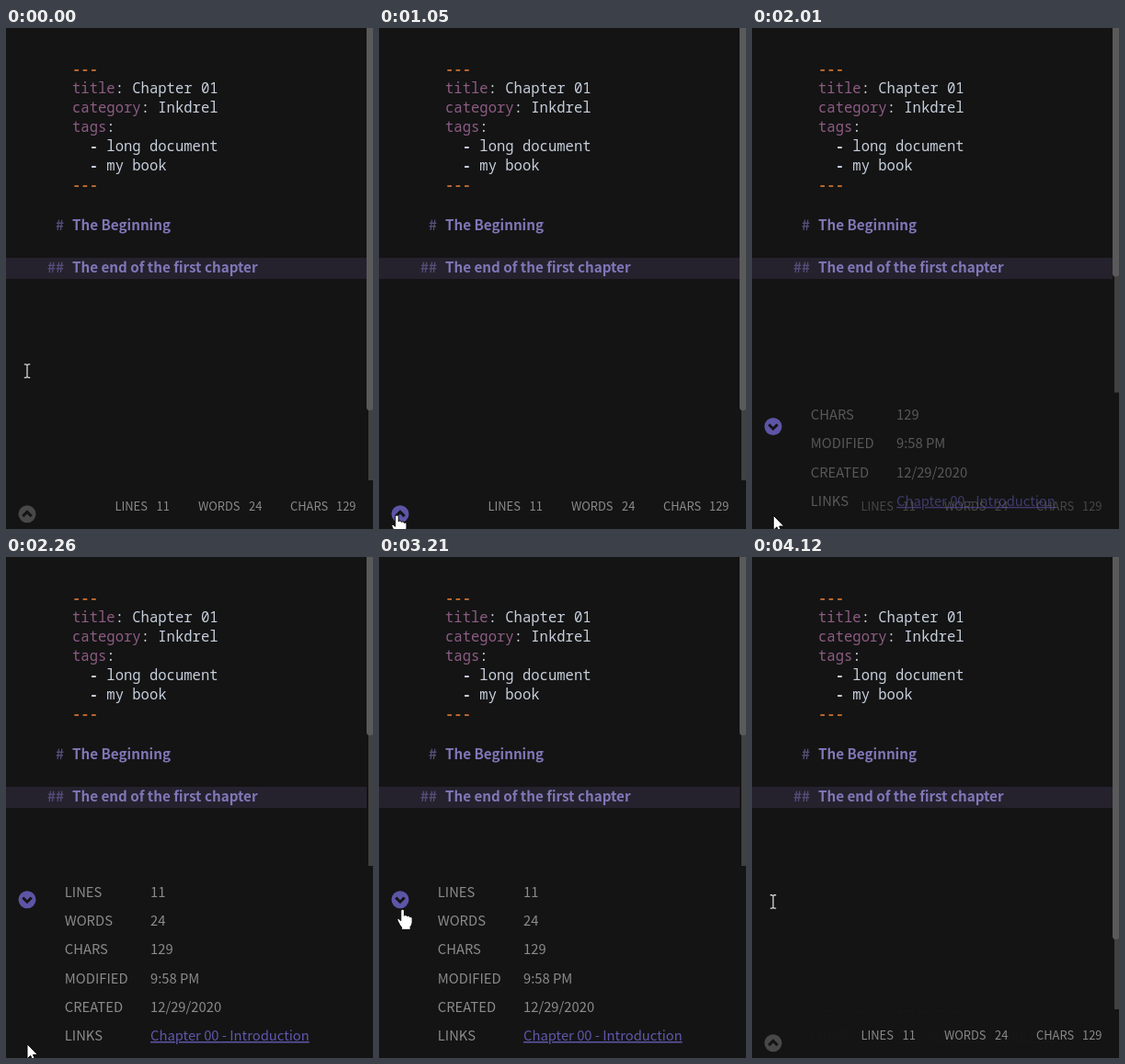
An HTML page for the animation above (4170 ms loop, 399 by 545 pixels).

```html
<!DOCTYPE html>
<html lang="en">
<head>
<meta charset="utf-8">
<title>Document details panel</title>
<style>
  html, body { margin: 0; width: 100%; height: 100%; overflow: hidden; background: #141414; }
  svg { display: block; width: 100vw; height: 100vh; }
  text { white-space: pre; }
  .mono { font: 500 15.55px "Noto Sans Mono", "DejaVu Sans Mono", monospace; fill: #c6cfdc; }
  .sans { font: 14.78px "Noto Sans CJK JP", "Noto Sans CJK SC", "Noto Sans CJK", "Noto Sans", sans-serif; fill: #8b8b8b; }
  .small { font-size: 12.9px; }
  .heading { font-size: 15.2px; font-weight: 700; fill: #8177b8; }
  .mark { fill: #544c76; text-anchor: end; }
  .rule { fill: #b5662f; }
  .dash { font-weight: 700; }
  .key { fill: #8d5c84; }
  .link { fill: #5f57ab; text-decoration: underline; }
</style>
</head>
<body>
<svg viewBox="0 0 399 545" preserveAspectRatio="xMinYMin meet">
  <defs><clipPath id="panelClip"><rect id="clipRect" width="399" height="300"/></clipPath></defs>
  <rect width="399" height="545" fill="#141414"/>
  <rect y="250" width="392" height="23" fill="#25222e"/>
  <g id="editor"></g>
  <rect id="track" x="394" width="5" fill="#414141"/>
  <rect id="thumb" x="392" y="-8" width="7.5" rx="3.5" fill="#5a5a5a"/>
  <rect id="panel" width="399" height="300" fill="#141414"/>
  <g clip-path="url(#panelClip)">
    <g id="status"></g>
    <g id="details"></g>
  </g>
  <g id="button">
    <circle id="disc" r="9.5"/>
    <path id="chevron" d="M-4.7 2.3 0 -2.4 4.7 2.3" fill="none" stroke="#141414" stroke-width="3"/>
  </g>
  <g id="pointer" stroke-linejoin="round">
    <path id="beam" fill="none" stroke="#d8d8d8" stroke-width="1.3"
      d="M-3.2 -7.2H-1.2L0 -6.3 1.2 -7.2H3.2M0 -6.5V6.5M-3.2 7.2H-1.2L0 6.3 1.2 7.2H3.2"/>
    <path id="arrow" fill="#fff" stroke="#000" stroke-width=".9"
      d="M0 0V16L3.7 12.6 6.2 18 8.8 16.9 6.4 11.7H11.5Z"/>
    <path id="hand" fill="#fff" stroke="#000" stroke-width=".9"
      d="M-1.8 1.5Q-1.8 0 0 0T1.8 1.5V7Q2 5.8 3.4 6T5 7.6Q5.3 6.6 6.6 6.9T8 8.5Q8.4 7.8 9.4 8.1T10.5 9.8V14
         Q10.5 17 8.5 19V22H-1V19.5Q-3 17.5 -4.8 13.5 -6.4 10.8 -5 10.2 -3.6 9.8 -1.8 12.4Z"/>
  </g>
</svg>
<script>
const LOOP = 4170, OPEN_AT = 1780, CLOSE_AT = 3690;
const TOP_CLOSED = 492, TOP_OPEN = 336, CONTENT_HEIGHT = 582;
const BUTTON_X = 23, BUTTON_OFFSET = 36.8;

// Pointer hotspot: time, x, y
const POINTER = [
  [0, 23, 373], [200, 23, 394], [400, 23, 394], [800, 23, 527], [900, 22, 518],
  [1050, 19.5, 530], [1150, 15, 530], [1350, 24, 531], [2260, 23, 530], [2310, 24, 522],
  [2710, 36, 415], [2860, 32, 398], [3410, 22, 375], [4120, 23, 375], [LOOP, 23, 373]
];

const $ = id => document.getElementById(id);
const set = (id, attrs) => {
  for (const name in attrs) $(id).setAttribute(name, attrs[name]);
};
const mix = (a, b, p) => a + (b - a) * p;
const progress = (t, start, length) => Math.min(1, Math.max(0, (t - start) / length));
const smooth = p => p * p * (3 - 2 * p);

function addText(parent, x, y, style, content) {
  const node = document.createElementNS("http://www.w3.org/2000/svg", "text");
  node.setAttribute("x", x);
  node.setAttribute("y", y);
  node.setAttribute("class", style);
  node.textContent = content;
  $(parent).append(node);
  return node;
}

// A line that starts with a differently styled part
function addLine(y, style, lead, rest) {
  const line = addText("editor", 72, y, "mono", "");
  const span = document.createElementNS(line.namespaceURI, "tspan");
  span.setAttribute("class", style);
  span.textContent = lead;
  line.append(span, rest);
}

function build() {
  addText("editor", 72, 49.5, "mono rule dash", "---");
  addLine(71, "key", "title", ": Chapter 01");
  addLine(92, "key", "category", ": Inkdrel");
  addLine(113, "key", "tags", ":");
  addLine(134, "dash", "  -", " long document");
  addLine(155, "dash", "  -", " my book");
  addText("editor", 72, 175.5, "mono rule dash", "---");

  [["#", "The Beginning", 220], ["##", "The end of the first chapter", 266]].forEach(([mark, title, y]) => {
    addText("editor", 63, y, "sans heading mark", mark);
    addText("editor", 72, y, "sans heading", title);
  });

  [["LINES", 118.5, "11", 163.5], ["WORDS", 209, "24", 264], ["CHARS", 309, "129", 359]].forEach(([label, x, value, valueX]) => {
    addText("status", x, 525, "sans small", label);
    addText("status", valueX, 525, "sans small", value);
  });

  [["LINES", "11"], ["WORDS", "24"], ["CHARS", "129"], ["MODIFIED", "9:58 PM"],
   ["CREATED", "12/29/2020"], ["LINKS", "Chapter 00 - Introduction"]].forEach(([label, value], i) => {
    const y = 370 + 31.2 * i;
    addText("details", 63.8, y, "sans", label);
    addText("details", 157, y, label === "LINKS" ? "sans link" : "sans", value);
  });
}

function pointerAt(t) {
  const i = POINTER.findIndex(key => key[0] > t);
  const [t0, x0, y0] = POINTER[i - 1], [t1, x1, y1] = POINTER[i];
  const p = (t - t0) / (t1 - t0);
  return [mix(x0, x1, p), mix(y0, y1, p)];
}

function draw(t) {
  const isOpen = t >= OPEN_AT && t < CLOSE_AT;
  const growth = smooth(progress(t, OPEN_AT + 30, 350)) - smooth(progress(t, CLOSE_AT + 30, 350));
  const top = mix(TOP_CLOSED, TOP_OPEN, growth);
  set("panel", { y: top });
  set("clipRect", { y: top });
  set("track", { height: top });
  set("thumb", { height: top * top / CONTENT_HEIGHT + 8 });

  // The closing cross-fade runs slightly past the loop point.
  const fadeTime = t < OPEN_AT ? t + LOOP : t;
  const shown = fadeTime < CLOSE_AT
    ? progress(t, OPEN_AT, 400)
    : (1 - progress(fadeTime, CLOSE_AT, 600)) ** 3;
  const slide = isOpen ? -16 * (1 - smooth(progress(t, OPEN_AT, 400))) : 0;
  set("details", { opacity: shown, transform: `translate(0 ${slide})` });
  set("status", { opacity: 1 - shown });

  const [x, y] = pointerAt(t);
  const buttonY = top + BUTTON_OFFSET;
  const hover = Math.hypot(x - BUTTON_X, y - buttonY) < 12;
  set("button", { transform: `translate(${BUTTON_X} ${buttonY})` });
  set("disc", { fill: isOpen || hover ? "#5d55a6" : "#484848" });
  set("chevron", { transform: isOpen ? "scale(1 -1)" : "" });

  const shape = hover ? "hand" : y < top ? "beam" : "arrow";
  for (const id of ["beam", "arrow", "hand"]) set(id, { visibility: id === shape ? "visible" : "hidden" });
  set("pointer", { transform: `translate(${x} ${y})` });
}

build();
const start = performance.now();
function tick() {
  draw((performance.now() - start) % LOOP);
  requestAnimationFrame(tick);
}
tick();
</script>
</body>
</html>
```
